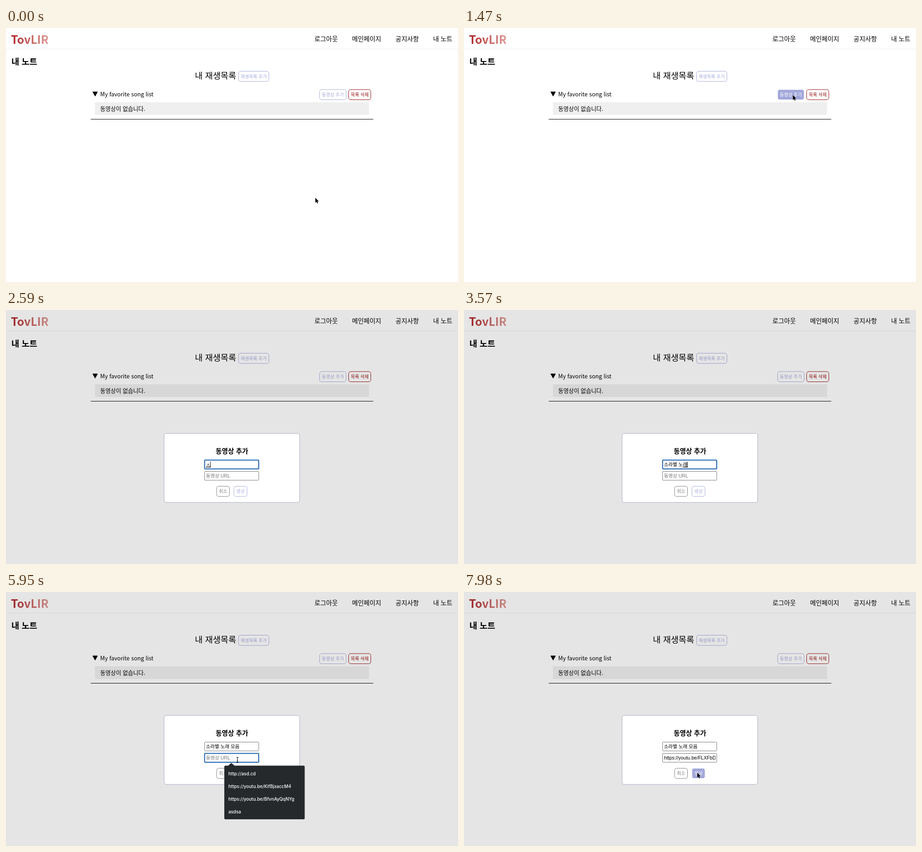
Recreate the animation shown at these times as an HTML page. Size 998 by 561 pixels, loop 8000 ms.

```html
<!DOCTYPE html>
<html lang="ko">
<head>
<meta charset="utf-8">
<title>내 노트</title>
<style>
  html, body { margin: 0; width: 100%; height: 100%; overflow: hidden; background: #fff; }
  svg { display: block; }
  text { font-family: "Noto Sans CJK KR", "Noto Sans CJK", sans-serif; white-space: pre; }
  .nav { font-size: 14px; }
  .head { font-size: 18.72px; }
  .body { font-size: 12.55px; }
  .bold { font-weight: 700; }
  .btn rect { fill: none; stroke: var(--c); }
  .btn text { font-size: 10px; fill: var(--c); }
  .btn.hot rect { fill: #a2a7db; stroke: #fff; }
  .btn.hot text { fill: #fff; }
  .field { fill: #fff; stroke: #767676; }
  .field.on { stroke: #1a5fae; stroke-width: 2; }
  .in { font-family: "Liberation Sans", "Noto Sans CJK KR", "Noto Sans CJK", sans-serif; font-size: 10.6px; }
  .hint { fill: #757575; }
  .menu text { font: 500 9.8px Inter, sans-serif; fill: #fff; }
</style>
</head>
<body>
<svg width="998" height="561" viewBox="0 0 998 561">
  <defs>
    <linearGradient id="red" gradientUnits="userSpaceOnUse" x1="11" x2="94">
      <stop stop-color="#ae2427"/><stop offset="1" stop-color="#dd9b95"/>
    </linearGradient>
    <clipPath id="inside"><rect x="440" y="357" width="115.5" height="19"/></clipPath>
  </defs>

  <text class="bold" x="11" y="34.5" font-size="25" fill="url(#red)">TovLIR</text>
  <g class="nav">
    <text x="681" y="28.5">로그아웃</text>
    <text x="764" y="28.5">메인페이지</text>
    <text x="860" y="28.5">공지사항</text>
    <text x="943" y="28.5">내 노트</text>
  </g>
  <rect y="46" width="998" height="1" fill="#eee"/>
  <text class="head bold" x="12" y="81">내 노트</text>
  <text class="head" x="417" y="112">내 재생목록</text>
  <path d="M191.5 141H202L196.8 150.5Z" stroke="#000" stroke-linejoin="round"/>
  <text class="body" x="208" y="150.5">My favorite song list</text>
  <rect x="196.5" y="164" width="605" height="28" fill="#efefef"/>
  <text class="body" x="208" y="183">동영상이 없습니다.</text>
  <rect x="187" y="201" width="624" height="1"/>
  <g id="page"></g>

  <g id="modal">
    <rect width="998" height="561" opacity=".1"/>
    <rect x="349" y="272.5" width="299.5" height="152.5" rx="5" fill="#fff" stroke="#a9acc2"/>
    <text class="bold" x="463" y="317" font-size="14.7">동영상 추가</text>
    <rect id="nameBox" class="field" x="438.5" y="331.5" width="119.5" height="19.5" rx="1.5"/>
    <rect id="urlBox" class="field" x="438.5" y="356.5" width="119.5" height="19.5" rx="1.5"/>
    <text id="name" class="in" x="441.5" y="345"></text>
    <g clip-path="url(#inside)"><text id="url" class="in" y="370"></text></g>
    <rect id="mark" y="346" height="1.5"/>
    <rect id="caret" width="1" height="13"/>
    <g id="actions"></g>
    <g id="menu" class="menu">
      <path d="M490 384L497.5 377.5L505 384Z" fill="#26292c"/>
      <rect x="482" y="383.5" width="177.5" height="118.5" rx="2.5" fill="#26292c"/>
      <text x="491" y="404.5">http://asd.cd</text>
      <text x="491" y="432.5">https://youtu.be/KifBjxaccM4</text>
      <text x="491" y="460.5">https://youtu.be/BfvnAyQqNYg</text>
      <text x="491" y="488.5">asdsa</text>
    </g>
  </g>

  <path id="arrow" d="M0 0V11L2.5 8.7L4.3 12.6L6.1 11.8L4.4 8H7.7Z" stroke="#fff" stroke-width=".8" paint-order="stroke"/>
  <path id="beam" d="M-2.5 -6Q0 -6 0 -4.5Q0 -6 2.5 -6M0 -4.5V4.5M-1.5 2H1.5M-2.5 6Q0 6 0 4.5Q0 6 2.5 6" fill="none" stroke="#000" stroke-width="1.1"/>
</svg>
<script>
const LOOP = 8000, STEP = 70;
const OPEN = 1540, TYPE = 2590, MOUSE = 4900, FOCUS = 5460, MENU = 5600, PASTE = 6300, BLUR = 7840;
const LINK = 'https://youtu.be/FLXFbDq7nRk';
const LILAC = '#a5aadb';
const $ = id => document.getElementById(id);

// time, text in the name field
const typed = [
  [0, ''], [2590, 'ㅅ'], [2660, '소'], [2800, '솔'], [2870, '소라'], [2940, '소랍'],
  [3080, '소라별'], [3220, '소라별 '], [3290, '소라별 노'], [3360, '소라별 놀'],
  [3570, '소라별 노래'], [3780, '소라별 노래 '], [3850, '소라별 노래 ㅁ'],
  [3990, '소라별 노래 모'], [4130, '소라별 노래 몽'], [4200, '소라별 노래 모음']
];

// start, end, x, y reached by the pointer
const moves = [
  [0, 0, 683, 375], [0, 840, 754, 151], [840, 1190, 726, 148], [1540, 2030, 569, 312],
  [4830, 5600, 511, 368], [5670, 5950, 511, 371], [6580, 7420, 515, 399]
];

function button(parent, x, y, w, label, color) {
  parent.insertAdjacentHTML('beforeend',
    `<g class="btn" style="--c:${color}"><rect x="${x}" y="${y}" width="${w}" height="22.5" rx="4.5"/>` +
    `<text x="${x + w / 2}" y="${y + 15}" text-anchor="middle">${label}</text></g>`);
  return { node: parent.lastElementChild, x, y, w, h: 22.5 };
}

button($('page'), 513.5, 95.5, 67, '재생목록 추가', LILAC);
const add = button($('page'), 692.5, 136, 58.5, '동영상 추가', LILAC);
button($('page'), 756.5, 136, 49, '목록 삭제', '#981212');
button($('actions'), 465, 389.3, 28.5, '취소', '#808080');
const create = button($('actions'), 503.2, 389.3, 29, '생성', LILAC);
const fields = [{ x: 438, y: 331, w: 120, h: 20 }, { x: 438, y: 356, w: 120, h: 20 }];

const show = (node, on) => node.style.display = on ? '' : 'none';
const within = (p, b) => p.x >= b.x && p.x <= b.x + b.w && p.y >= b.y && p.y <= b.y + b.h;
const lastBefore = (list, t) => list.filter(e => e[0] <= t).pop();

function pointer(t) {
  let [, , x, y] = moves[0];
  for (const [a, b, tx, ty] of moves.slice(1)) {
    if (t <= a) break;
    const k = Math.min(1, (t - a) / (b - a)), e = k * k * (3 - 2 * k);
    x += (tx - x) * e;
    y += (ty - y) * e;
  }
  return { x, y };
}

function drawPointer(t) {
  const p = pointer(t), open = t >= OPEN;
  const visible = t < TYPE || t >= MOUSE;
  const text = open && fields.some(f => within(p, f));
  for (const id of ['arrow', 'beam']) {
    show($(id), visible && (id === 'beam') === text);
    $(id).setAttribute('transform', `translate(${p.x} ${p.y})`);
  }
  add.node.classList.toggle('hot', within(p, add));
  create.node.classList.toggle('hot', open && within(p, create));
}

function drawForm(t) {
  const [key, value] = lastBefore(typed, t);
  const name = $('name'), url = $('url');
  const onName = t < FOCUS, onUrl = !onName && t < BLUR, pasted = t >= PASTE;

  name.textContent = value || '동영상 이름';
  name.classList.toggle('hint', !value);
  url.textContent = pasted ? LINK : '동영상 URL';
  url.classList.toggle('hint', !pasted);

  // a focused field keeps the end of a long link in view
  const atEnd = pasted && onUrl;
  url.setAttribute('x', atEnd ? 554.5 : 441.5);
  url.setAttribute('text-anchor', atEnd ? 'end' : 'start');
  $('nameBox').classList.toggle('on', onName);
  $('urlBox').classList.toggle('on', onUrl);

  const width = value ? name.getComputedTextLength() : 0;
  const composing = onName && value && !value.endsWith(' ');
  show($('mark'), composing);
  if (composing) {
    const last = name.getSubStringLength(value.length - 1, 1);
    $('mark').setAttribute('x', 441.5 + width - last);
    $('mark').setAttribute('width', last);
  }

  const since = onName ? Math.max(OPEN, key) : pasted ? PASTE : FOCUS;
  show($('caret'), (onName || onUrl) && (t + 20 - since) % 1000 < 500);
  $('caret').setAttribute('x', onName ? 441 + width : pasted ? 554.5 : 441);
  $('caret').setAttribute('y', onName ? 335 : 360);
  show($('menu'), t >= MENU && t < PASTE);
}

function frame(now) {
  const t = Math.floor(now % LOOP / STEP) * STEP;
  show($('modal'), t >= OPEN);
  if (t >= OPEN) drawForm(t);
  drawPointer(t);
}

const start = performance.now();
(function tick() {
  frame(performance.now() - start);
  requestAnimationFrame(tick);
})();
</script>
</body>
</html>
```
